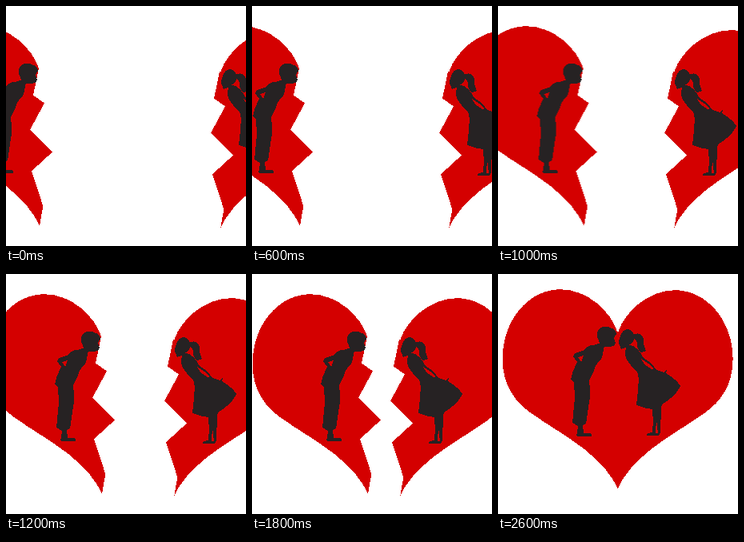
An HTML page for the animation above (2800 ms loop, 300 px wide and 300 px high).

```html
<!DOCTYPE html>
<html lang="en">
<head>
<meta charset="utf-8">
<title>Two halves of a heart</title>
<style>
  html, body { margin: 0; width: 100%; height: 100%; overflow: hidden; background: #fff; }
  svg { display: block; width: 100vw; height: 100vh; shape-rendering: crispEdges; }
  .heart { fill: #d40000; }
  .figure { fill: #262223; stroke: #262223; stroke-width: 0; fill-rule: evenodd; stroke-linecap: round; }
</style>
</head>
<body>
<svg viewBox="0 0 300 300">
  <g id="right">
    <path class="heart"/>
    <g class="figure">
      <!-- girl: head, ponytail, dress with arm, legs, shoes -->
      <ellipse cx="162" cy="79" rx="8.500" ry="10"/>
      <path d="M154 74L150.500 85L154 94L162 91L170 82Z"/>
      <path d="M167 78Q173 72 179 76Q183 80 182 87L185 96L179 98Q174 95 174 88Q174 81 169 81Z"/>
      <path d="M160 88L169 90Q177 95 181 104L192 112L198 120L207 123L212 118L210 124Q222 131 228 140
        Q223 152 205 163L203 170L186 168L173 164Q175 147 176 131L174 122Q162 112 159 102Z
        M179 106L183 113L192 119L195 118L188 112Z"/>
      <path d="M192 165L194 182L193 199L197 199L198 182L200 199L203 199L204 165Z"/>
      <path stroke-width="3" d="M187 201L194 199M192 201L201 200"/>
    </g>
  </g>
  <g id="left">
    <path class="heart"/>
    <g class="figure">
      <!-- boy: hair, face, body with arm, shoe -->
      <ellipse cx="134.500" cy="76" rx="11" ry="10.500"/>
      <path d="M140 67L145 69L148.500 74L145 80L147 86L145 90L138 91L128 92L126 82Z"/>
      <path d="M129 86L132 93Q131 103 128 108Q122 112 120 121L114 133L115.500 150L110 187L106 189L107 199L99 199L100 190
        L93 186L96 155L95 135L91 132Q93 122 97 114L99 110L94 103L96 99L108 95Q112 89 119 89Z
        M100 104L104 110L107 102Z"/>
      <path stroke-width="4" d="M100 201L115.500 201.500"/>
    </g>
  </g>
</svg>
<script>
  const LOOP = 2800, COUNT = 11;
  const LONG = [1, 6, 7];          // poses held twice as long
  const WIDTH = 299.3;             // mirror: x -> WIDTH - x

  // Outer curve from the notch to the tip, and the crack back up
  const lobe = [[149, 72], [141, 47], [112, 19.2], [78, 19.2], [38, 19.2], [5.7, 58], [5.7, 106],
    [5.7, 140], [22, 160], [40, 173], [64, 190], [86, 202], [108, 219], [128, 235], [143, 252], [150, 269]];
  const crack = 'L154.3 244L140 200.3L166 176.5L138 148.7L156 115.5L142 105.5L149 72Z';

  function half(map) {
    const [first, ...rest] = lobe.map(map);
    return `M149 72L${first}C${rest.join(' ')}L150 269${crack}`;
  }

  // Straight travel between [pose, x] keys
  function travel(keys, i) {
    const n = Math.max(1, keys.findIndex(k => k[0] >= i));
    const [[a, from], [b, to]] = [keys[n - 1], keys[n]];
    return from + (to - from) * (i - a) / (b - a);
  }

  const leftX = [[0, -108], [2, -90], [3, -55], [7, -5], [8, -5], [9, -2], [10, 0]];
  const rightX = [[0, 118], [2, 96], [3, 80], [5, 60], [7, 35], [8, 10], [9, 1], [10, 0]];
  const leftY = i => i < 8 ? 6 : i < 9 ? 4 : 0;
  const rightY = i => i < 9 ? 10 : 0;

  function setUp(id, map, xKeys, y) {
    const group = document.getElementById(id);
    group.querySelector('.heart').setAttribute('d', half(map));

    const frames = [];
    let time = 0;
    for (let i = 0; i < COUNT; i++) {
      const transform = `translate(${travel(xKeys, i)}px, ${y(i)}px)`;
      frames.push({ offset: time / LOOP, transform, easing: 'step-end' });
      time += LONG.includes(i) ? 400 : 200;
    }
    frames.push({ offset: 1, transform: frames[COUNT - 1].transform });
    group.animate(frames, { duration: LOOP, iterations: Infinity });
  }

  setUp('left', p => p, leftX, leftY);
  setUp('right', ([x, y]) => [WIDTH - x, y + (y < 60 ? 1 : 0)], rightX, rightY);
</script>
</body>
</html>
```
